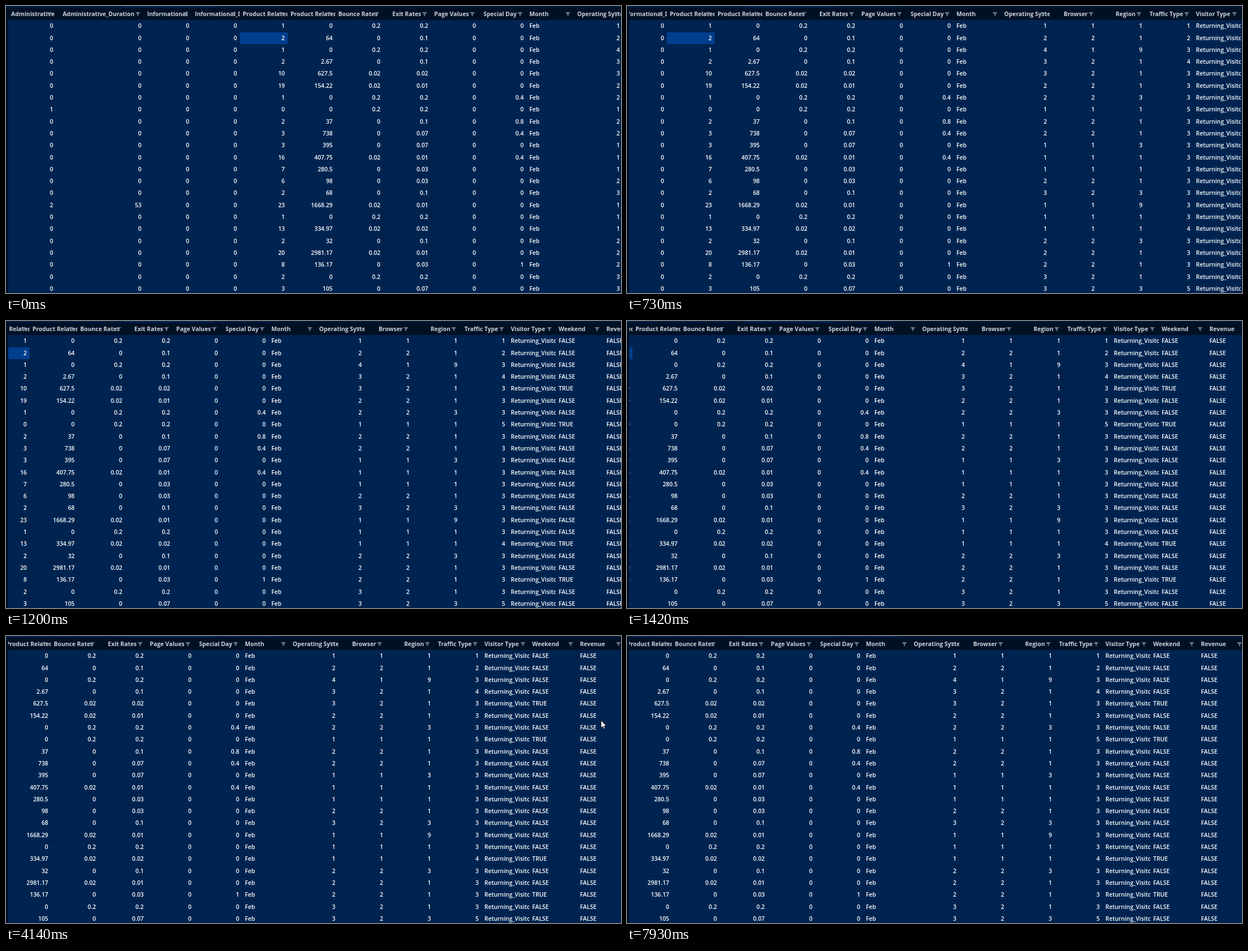
An HTML page that plays this animation: 1094 by 512 pixels, repeating every 8000 ms.

```html
<!DOCTYPE html>
<html lang="en">
<head>
<meta charset="utf-8">
<title>Session data grid</title>
<style>
  html, body { margin: 0; width: 100%; height: 100%; overflow: hidden; background: #001126; }
  #stage { position: relative; width: 1094px; height: 512px; overflow: hidden;
    background: #001126; font: 600 10.4px "Open Sans", "Noto Sans", sans-serif; color: #fff; }
  #tabs { position: absolute; left: 0; top: 0; width: 100%; height: 3px;
    background: linear-gradient(90deg, #001c40 208px, #001126 208px 209px, #002451 209px 370px,
      #001c40 370px 485px, #001126 485px 486px, #001733 486px); }
  #view { position: absolute; left: 4px; top: 4px; right: 0; bottom: 0; overflow: hidden; }
  #grid { position: absolute; left: 0; top: 0; }
  .col { position: absolute; top: 0; overflow: hidden; white-space: pre; }
  .head, .cell { box-sizing: border-box; height: 21.3px; line-height: 21.3px; padding: 0 5px; }
  .head { position: relative; padding-right: 0; font-weight: 700; color: #ccd2da; }
  .head span { display: inline-block; min-width: calc(100% - 17.5px); }
  .head svg { position: absolute; right: 7px; top: 7px; fill: #7c8796; opacity: .85; }
  .cell { background: #002451; box-shadow: inset 1px 0 #001f48, inset 0 -1px #001e45; }
  .num { text-align: right; }
  .picked { background: #003f8e; box-shadow: none; }
  #cursor { position: absolute; left: 0; top: 0; overflow: visible; }
</style>
</head>
<body>
<div id="stage">
  <div id="tabs"></div>
  <div id="view"><div id="grid"></div></div>
  <svg id="cursor" width="11" height="18">
    <path d="M.5 .5V14L3.6 11.2L5.7 16L7.8 15.1L5.7 10.3H9.8Z" fill="#fff" stroke="#000" stroke-width=".8"/>
  </svg>
</div>
<script>
const LOOP = 8000, TICK = 76, ROWS = 23, COL = 85.1;

const rows = rule => Array.from({ length: ROWS }, (_, i) => String(rule(i)));
const list = text => text.split(' ');
const round2 = value => Math.round(value * 100) / 100;

const pages = list('1 2 1 2 10 19 1 0 2 3 3 16 7 6 2 23 1 13 2 20 8 2 3');
const seconds = list('0 64 0 2.67 627.5 154.22 0 0 37 738 395 407.75 280.5 98 68 1668.29 0 334.97 32 2981.17 136.17 0 105');
const systems = list('1 2 4 3 3 2 2 1 2 2 1 1 1 2 3 1 1 1 2 2 2 3 3');
const specialDays = { 6: 0.4, 8: 0.8, 9: 0.4, 11: 0.4, 20: 1 };

// A visit without any time on a page counts as a full bounce.
const bounced = i => seconds[i] === '0';

const columns = [
  ['Administrative', rows(i => i === 7 ? 1 : i === 15 ? 2 : 0)],
  ['Administrative_Duration', rows(i => i === 15 ? 53 : 0)],
  ['Informational', rows(() => 0)],
  ['Informational_Duration', rows(() => 0)],
  ['Product Related', pages],
  ['Product Related Duration', seconds],
  ['Bounce Rates', rows(i => bounced(i) ? 0.2 : pages[i] > 9 ? 0.02 : 0)],
  ['Exit Rates', rows(i => bounced(i) ? 0.2 : round2(0.2 / pages[i]))],
  ['Page Values', rows(() => 0)],
  ['Special Day', rows(i => specialDays[i] ?? 0)],
  ['Month', rows(() => 'Feb')],
  ['Operating Systems', systems],
  ['Browser', rows(i => systems[i] % 3 === 1 ? 1 : 2)],
  ['Region', rows(i => i % 13 === 2 ? 9 : i % 4 === 2 ? 3 : 1)],
  ['Traffic Type', rows(i => i % 15 === 7 ? 5 : i % 14 === 3 ? 4 : Math.min(i + 1, 3))],
  ['Visitor Type', rows(() => 'Returning_Visitor')],
  ['Weekend', rows(i => [4, 7].includes(i % 13) ? 'TRUE' : 'FALSE')],
  ['Revenue', rows(() => 'FALSE')]
];

const funnel = '<svg width="9" height="8"><path d="M0 0H9L5.6 4V7.5L3.4 6V4Z"/></svg>';
const grid = document.getElementById('grid');
const leftEdge = i => i < 2 ? i * 85 : Math.round(241.5 + (i - 2) * COL);

columns.forEach(([title, values], c) => {
  const align = isNaN(values[0]) ? '' : ' num';
  const col = document.createElement('div');
  col.className = 'col';
  col.style.left = leftEdge(c) + 'px';
  col.style.width = leftEdge(c + 1) - leftEdge(c) + 'px';
  col.innerHTML = `<div class="head"><span class="${align}">${title}</span>${funnel}</div>` +
    values.map((value, r) =>
      `<div class="cell${align}${c === 4 && r === 1 ? ' picked' : ''}">${value}</div>`).join('');
  grid.append(col);
});

function play(element, origin, moves) {
  const frames = [];
  let [x, y] = origin;
  const add = (time, px, py) => frames.push({
    offset: time / LOOP, easing: 'step-end',
    transform: `translate(${Math.round(px)}px, ${Math.round(py)}px)`
  });
  add(0, x, y);
  for (const { from, to = from, at: [endX, endY], power = 2 } of moves) {
    const steps = Math.round((to - from) / TICK) + 1;
    for (let k = 1; k <= steps; k++) {
      const done = 1 - (1 - k / steps) ** power;
      const time = steps > 1 ? from + (to - from) * (k - 1) / (steps - 1) : from;
      add(time, x + (endX - x) * done, y + (endY - y) * done);
    }
    [x, y] = [endX, endY];
  }
  element.animate(frames, { duration: LOOP, iterations: Infinity });
}

play(grid, [0, 0], [
  { from: 500, to: 730, at: [-345, 0], power: 1.74 },
  { from: 960, to: 1270, at: [-487, 0], power: 1 },
  { from: 1420, at: [-491, 0] },
  { from: 2830, at: [-506, 0] }
]);

const away = [-50, -50];
play(document.getElementById('cursor'), away, [
  { from: 2830, at: [1057, 359] },
  { from: 3150, to: 3220, at: [1074, 156] },
  { from: 3450, to: 3610, at: [1060, 14] },
  { from: 3760, to: 4140, at: [1058, 150] },
  { from: 4220, to: 4530, at: [1040, 48] },
  { from: 4610, to: 4840, at: [1039, 170] },
  { from: 4920, to: 5150, at: [1047, 34] },
  { from: 5380, to: 5530, at: [1042, 127] },
  { from: 5600, to: 5680, at: [1048, 42] },
  { from: 5910, to: 6220, at: [1042, 477] },
  { from: 6370, to: 6530, at: [1052, 501] },
  { from: 6610, at: away },
  { from: 7540, at: [761, 470] },
  { from: 7620, to: 7690, at: [624, 321] },
  { from: 7860, at: [617, 320] },
  { from: 7930, at: away }
]);
</script>
</body>
</html>
```
